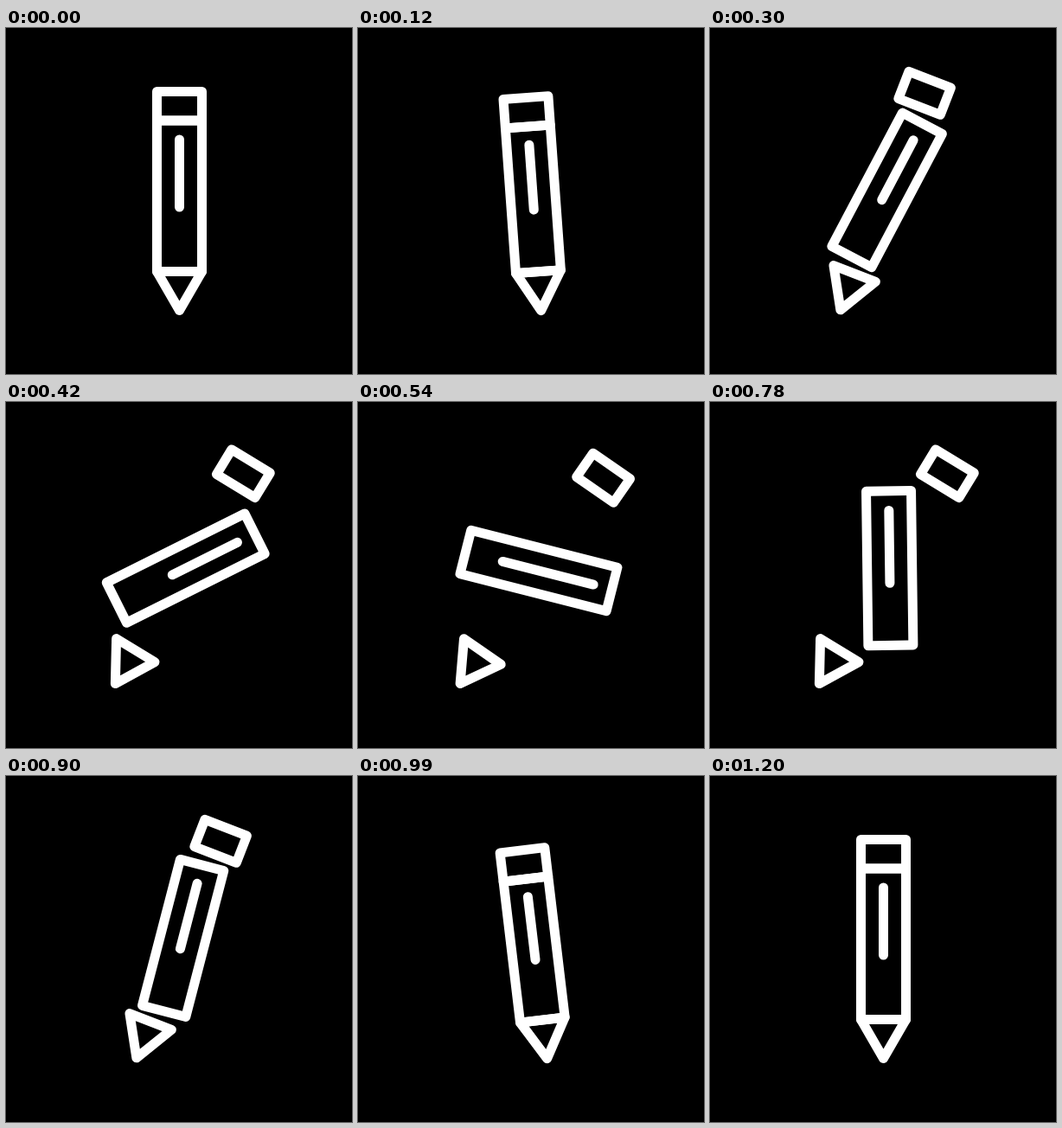
An HTML page with a canvas for the animation above (3.32 s loop, 400 px wide and 400 px high).

```html
<!DOCTYPE html>
<html lang="en">
<head>
<meta charset="utf-8">
<title>Pencil</title>
<style>
  html, body { margin: 0; width: 100%; height: 100%; overflow: hidden; background: #000; }
  canvas { display: block; width: 100vw; height: 100vh; }
</style>
</head>
<body>
<canvas id="stage" width="400" height="400"></canvas>
<script>
const ctx = document.getElementById('stage').getContext('2d');
const LOOP = 3320, STEP = 30, MID = 600, WINDUP = 210;
const HALF_W = 26, HALF_L = 87.25, CAP_H = 33.5, TIP_H = 45;
const LINE_FAR = 65.25, LINE_NEAR = 12.75;
const RAD = Math.PI / 180;

const clamp = x => Math.min(1, Math.max(0, x));
const smooth = x => { x = clamp(x); return x * x * (3 - 2 * x); };

// Tilt in degrees: small wind-up, fast swing out, mirrored around MID.
function tiltAt(t) {
  const m = MID - Math.abs(t - MID);
  if (m <= WINDUP) return -6.8 * smooth(m / WINDUP);
  const p = (m - WINDUP) / (MID - WINDUP);
  return -6.8 + 42 * smooth(Math.cbrt(p));
}

function path(points, closed = true) {
  ctx.beginPath();
  points.forEach(([x, y]) => ctx.lineTo(x, y));
  if (closed) ctx.closePath();
  ctx.stroke();
}

function box(y0, y1) {
  path([[-HALF_W, y0], [HALF_W, y0], [HALF_W, y1], [-HALF_W, y1]]);
}

function rotated(angle, draw) {
  ctx.save();
  ctx.rotate(angle * RAD);
  draw();
  ctx.restore();
}

function render(t) {
  t = Math.min(t, 2 * MID);
  const tilt = tiltAt(t);
  const gap = 0.766 * tilt;
  const spin = 180 * smooth((t - WINDUP) / (2 * (MID - WINDUP)));
  const away = Math.abs(t - MID);
  const grow = clamp(1 - away / 250) ** 2;
  const bulge = 2 * Math.sin(Math.PI * clamp((away - 60) / 240));
  const k = 1 + (Math.min(gap, 0) + bulge) / HALF_L;

  // The tip keeps touching the ground line.
  const x = 200.5 + (tilt < 0 ? -0.46 * tilt : 0.12 * tilt + 0.0035 * tilt * tilt);
  const y = 326.5 - 0.03 * tilt - (HALF_L + TIP_H + gap) * Math.cos(tilt * RAD);

  ctx.fillStyle = '#000';
  ctx.fillRect(0, 0, 400, 400);
  ctx.strokeStyle = '#fff';
  ctx.lineWidth = 11;
  ctx.lineCap = ctx.lineJoin = 'round';
  ctx.save();
  ctx.translate(x, y);

  rotated(tilt, () => {
    const edge = HALF_L + gap;
    box(-edge - CAP_H, -edge);
    path([[-HALF_W, edge], [HALF_W, edge], [0, edge + TIP_H]]);
  });

  rotated(tilt + spin, () => {
    box(-HALF_L * k, HALF_L * k);
    const reach = LINE_NEAR + (LINE_FAR - LINE_NEAR) * grow;
    const [a, b] = t < MID ? [-LINE_FAR, reach] : [-reach, LINE_FAR];
    path([[0, a * k], [0, b * k]], false);
  });

  ctx.restore();
}

const start = performance.now();
function tick() {
  const t = (performance.now() - start) % LOOP;
  render(Math.floor(t / STEP) * STEP);
  requestAnimationFrame(tick);
}
tick();
</script>
</body>
</html>
```
